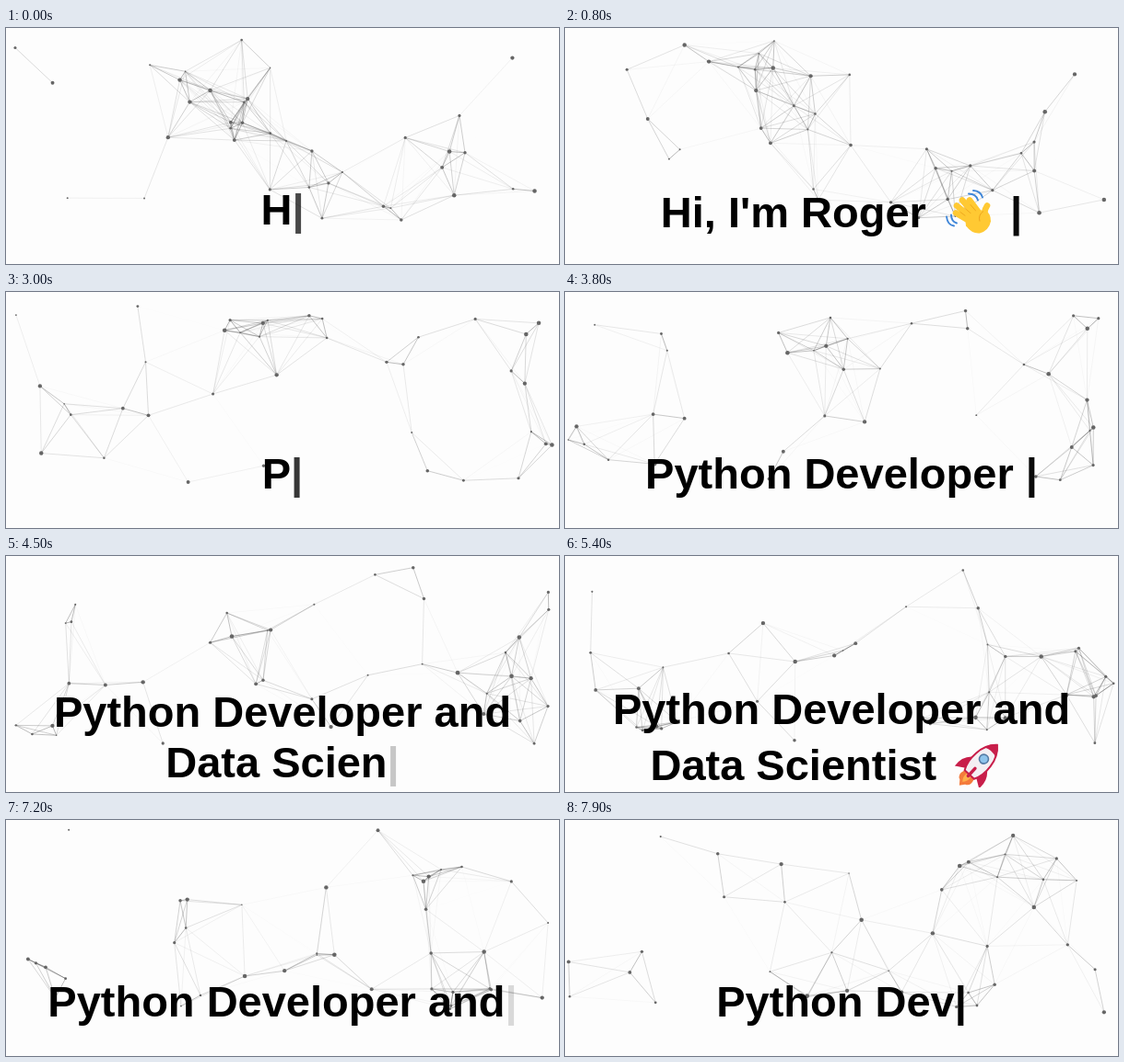
Recreate the animation shown at these times as an HTML page with a canvas. Size 600 px wide and 257 px high, loop 8 s.

```html
<!DOCTYPE html>
<html lang="en">
<head>
<meta charset="utf-8">
<title>Typed intro</title>
<style>
html, body { margin: 0; width: 100%; height: 100%; overflow: hidden; background: #fdfdfd; }
.stage { position: absolute; inset: 0; overflow: hidden; contain: strict; }
canvas { position: absolute; left: 0; top: 0; }
.line {
  position: absolute; left: 0; top: 197.2px; width: 600px;
  transform: translateY(-50%); text-align: center;
  font: bold 47px "Liberation Sans", Arial, sans-serif; color: #000;
}
.emoji { width: 65px; height: 58px; vertical-align: -8px; }
.cursor { animation: blink 1s -.58s infinite; }
@keyframes blink { 0%, 100% { opacity: 0; } 50% { opacity: 1; } }
</style>
</head>
<body>
<div class="stage">
  <svg width="0" height="0" style="position:absolute">
    <symbol id="wave" viewBox="0 0 65 58">
      <g fill="none" stroke-linecap="round" stroke-linejoin="round">
        <g stroke="#ffc933" stroke-width="6.6">
          <path d="M36 45 19 35M37 41 20 27M41 38 26 21M45 36 34 21"/>
          <path d="M50 43Q49 33 53 27"/>
        </g>
        <path stroke="#eda41c" stroke-width=".9" d="M24 34 32 40M28 29 36 36M35 26 41 33"/>
        <path stroke="#3f86d8" stroke-width="1.9"
              d="M33 14Q41 14 43 21M38 10.5Q46 11 48 18M14 37Q14 44 20 46M9 39Q10 48 17 49"/>
      </g>
      <path fill="#ffc933" d="M29 38 43 32 51 32Q57 35 57 44 55 54 45 57 37 58 30 49Z"/>
      <path fill="none" stroke="#eda41c" d="M49 33Q43 37 45 44"/>
    </symbol>
    <symbol id="rocket" viewBox="0 0 65 58">
      <g transform="translate(33 33) rotate(43)">
        <path fill="#f47b3c" d="M-7 15Q-10 24-4 26L0 31 4 26Q10 24 7 15Z"/>
        <path fill="#fdb04c" d="M-3 16Q-4 22 0 26 4 22 3 16Z"/>
        <path fill="#c81e4a" d="M-9-3Q-20 5-18 19L-7 12ZM9-3Q20 5 18 19L7 12Z"/>
        <path fill="#f4eff3" stroke="#c81e4a" stroke-width="2"
              d="M0-29C13-18 13 4 7 15H-7C-13 4-13-18 0-29Z"/>
        <path fill="#c81e4a" d="M0-30Q6-25 8-18 0-22-8-18-6-25 0-30Z"/>
        <circle cy="-8" r="5" fill="#8fc4ec" stroke="#557ba5" stroke-width="1.6"/>
        <path stroke="#c81e4a" stroke-width="3.5" stroke-linecap="round" d="M0 6V17"/>
      </g>
    </symbol>
  </svg>
  <canvas id="net" width="600" height="257"></canvas>
  <div class="line"><span id="typed"></span><span class="cursor">|</span></div>
</div>
<script>
const LOOP = 8000;
const COUNT = 38;
const REACH = 100;   // longest link between dots
const SPEED = 0.15;  // px per ms, spread over both directions
const BOX = { left: 3, right: 597, top: 9, bottom: 210 };

const phrases = [
  { text: "Hi, I'm Roger 👋 ", start: 0, type: 50, erase: 1870, back: 65 },
  { text: "Python Developer and Data Scientist 🚀 ", start: 2970, type: 50, erase: 5905, back: 70 }
];
const icons = { "👋": "wave", "🚀": "rocket" };

const ctx = document.getElementById("net").getContext("2d");
const typed = document.getElementById("typed");
let shown = null;

function seeded(seed) {
  return () => {
    seed = (seed + 0x6d2b79f5) | 0;
    let n = Math.imul(seed ^ (seed >>> 15), seed | 1);
    n ^= n + Math.imul(n ^ (n >>> 7), n | 61);
    return ((n ^ (n >>> 14)) >>> 0) / 2 ** 32;
  };
}

const random = seeded(7);
const dots = Array.from({ length: COUNT }, () => ({
  x: BOX.left + random() * (BOX.right - BOX.left),
  y: BOX.top + random() * (BOX.bottom - BOX.top),
  vx: (random() - 0.5) * SPEED,
  vy: (random() - 0.5) * SPEED,
  r: 0.7 + 1.6 * random()
}));

// Keep a value between two walls by reflecting it
function bounce(v, lo, hi) {
  const span = hi - lo;
  const m = (((v - lo) % (2 * span)) + 2 * span) % (2 * span);
  return lo + (m < span ? m : 2 * span - m);
}

function drawNet(t) {
  const places = dots.map(d => ({
    x: bounce(d.x + d.vx * t, BOX.left, BOX.right),
    y: bounce(d.y + d.vy * t, BOX.top, BOX.bottom),
    r: d.r
  }));
  ctx.clearRect(0, 0, 600, 257);
  ctx.lineWidth = 0.8;
  places.forEach((a, i) => {
    for (const b of places.slice(i + 1)) {
      const d = Math.hypot(b.x - a.x, b.y - a.y);
      if (d >= REACH) continue;
      ctx.strokeStyle = `rgba(70,70,70,${0.55 * (1 - d / REACH)})`;
      ctx.beginPath();
      ctx.moveTo(a.x, a.y);
      ctx.lineTo(b.x, b.y);
      ctx.stroke();
    }
  });
  ctx.fillStyle = "#666";
  for (const { x, y, r } of places) {
    ctx.beginPath();
    ctx.arc(x, y, r, 0, 2 * Math.PI);
    ctx.fill();
  }
}

function textAt(t) {
  const p = t < phrases[1].start ? phrases[0] : phrases[1];
  const chars = [...p.text];
  const count = t < p.erase
    ? 1 + Math.floor((t - p.start) / p.type)
    : chars.length - Math.floor((t - p.erase) / p.back);
  return chars.slice(0, Math.max(0, count));
}

function showText(t) {
  const html = textAt(t).map(c =>
    icons[c] ? `<svg class="emoji"><use href="#${icons[c]}"/></svg>` : c
  ).join("");
  if (html !== shown) typed.innerHTML = shown = html;
}

let begin;
function frame(now) {
  begin ??= now;
  const t = (now - begin) % LOOP;
  drawNet(t);
  showText(t);
  requestAnimationFrame(frame);
}
drawNet(0);
showText(0);
requestAnimationFrame(frame);
</script>
</body>
</html>
```
